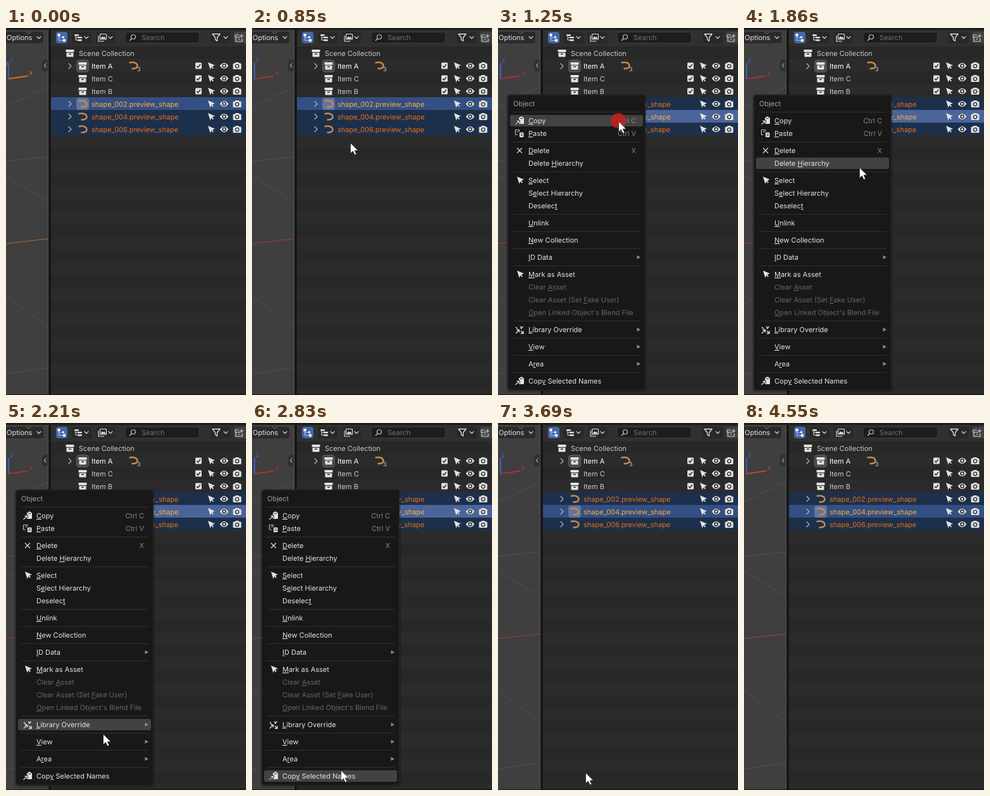
Recreate the animation shown at these times as an HTML page. Size 379 px wide and 578 px high, loop 5080 ms.

```html
<!DOCTYPE html>
<html lang="en">
<head>
<meta charset="utf-8">
<title>Outliner context menu</title>
<style>
html, body { margin: 0; width: 100%; height: 100%; overflow: hidden; background: #161616; }
svg { display: block; width: 379px; height: 578px; }
text { font: 11px Inter, sans-serif; white-space: pre; text-rendering: geometricPrecision; }
.key { text-decoration: underline; text-decoration-skip-ink: none; }
</style>
</head>
<body>
<svg id="stage" viewBox="0 0 379 578"></svg>
<script>
const LOOP = 5080;
const stage = document.getElementById('stage');

// Drawing helpers
const rect = (x, y, w, h, fill, r = 0, more = '') =>
  `<rect x="${x}" y="${y}" width="${w}" height="${h}" rx="${r}" fill="${fill}" ${more}/>`;
const line = (d, color, w = 1, more = '') =>
  `<path d="${d}" fill="none" stroke="${color}" stroke-width="${w}" ${more}/>`;
const fill = (d, color) => `<path d="${d}" fill="${color}"/>`;
const label = (x, y, s, color, more = '') =>
  `<text x="${x}" y="${y + 4}" fill="${color}" ${more}>${s}</text>`;
const at = (x, y, body) => `<g transform="translate(${x} ${y})">${body}</g>`;
const group = (id, body, more = '') => `<g id="${id}" ${more}>${body}</g>`;

// Icons, each centred on 0,0
const LIGHT = '#e2e2e2';
const round = 'stroke-linecap="round" stroke-linejoin="round"';
const chevronDown = line('M-3 -1.5L0 1.5L3 -1.5', '#cfcfcf', 1.2, round);
const chevronRight = line('M-2 -4L2 0L-2 4', '#b4b4b4', 1.2, round);
const box = rect(-6.5, -6, 13, 4, LIGHT, .8) + rect(-5.5, -1, 11, 6.5, LIGHT, .8) + rect(-2, .3, 4, 1.5, '#2b2b2b');
const pointer = fill('M-5 -6L6 -1.2L1.8 .2L4 3.2L2.6 4.2L.4 1.4L-1.4 5.4Z', LIGHT);
const eye = fill('M-6.8 0Q0 -9 6.8 0Q0 9 -6.8 0Z', LIGHT) +
  '<circle r="2.5" fill="#e2e2e2" stroke="#252525" stroke-width="1.5"/>';
const camera = rect(-6.5, -4, 13, 9.5, LIGHT, 1.5) + rect(-3, -5.6, 6, 3, LIGHT, 1) +
  '<circle cy=".6" r="2.7" fill="#e2e2e2" stroke="#252525" stroke-width="1.3"/>';
const check = rect(-5, -5, 10, 10, LIGHT, 1.5) + line('M-2.8 .2L-.8 2.4L3 -2.4', '#222', 1.5);
const curve = line('M-5.5 -4.5C1 -6 6.5 -3.5 6.5 .5C6.5 4 3 5 -1.5 5', '#c58b4f', 2.4, round);
const clip = rect(-1, -5, 8, 10, LIGHT, 1) + rect(1, -6.5, 4, 3, LIGHT, 1) + rect(1, -4, 4, 1, '#222');
const copyIcon = clip + line('M-6.5 6L-1 .8M-4.5 .3H-.7V4', '#181818', 3) +
  line('M-6.5 6L-1 .8M-4.5 .3H-.7V4', LIGHT, 1.2);
const pasteIcon = line('M-6.5 -5.5H-.5V-3M-6.5 -5.5V2H-3M-4 -2.5H-1', '#bdbdbd', 1.2) +
  rect(0, -1.5, 6.5, 7.5, LIGHT, 1) + line('M1.7 1H5M1.7 3.3H5', '#222');
const cross = line('M-4 -4L4 4M4 -4L-4 4', LIGHT, 1.1);
const overrideIcon = line('M-6 6L-1 1M-4.5 .5H-.5V4.5M-6 -4L-3 -1M1 -5L4 -2M2 2L6 6M6 2V6H2M2 -1L5.5 -5', LIGHT, 1.3);
const caret = fill('M-2.5 -3L3 0L-2.5 3Z', '#8c8c8c');

function viewport() {
  const grid = ['M0 124L66 93', 'M0 210L66 203', 'M0 233L66 273', 'M0 421L66 471', 'M0 545L66 535'];
  return rect(0, 3, 66, 574, '#3f3f3f') +
    grid.map(d => line(d, '#505050')).join('') +
    `<path id="axis" d="M0 339.5L66 332" fill="none" stroke-width="1.2"/>` +
    group('gizmoZ', line('M4 80V55', 'currentColor', 2) + label(5.5, 50, 'z', 'currentColor', 'font-weight="600"')) +
    group('gizmoX', line('M4 80L35 75.5', 'currentColor', 2) + label(36.5, 70, 'x', 'currentColor', 'font-weight="600"')) +
    group('gizmoY', label(-2, 54, 'y', '#777')) +
    rect(-6, 6, 65, 18, '#2a2a2a', 4) + label(1, 15, 'Options', '#e6e6e6') + at(52, 15, chevronDown) +
    line('M32 6L36 9L40 6', '#777') +
    rect(57, 50, 12, 18, '#303030', 4) + line('M63.5 55.5L60.5 59L63.5 62.5', '#bbb', 1.1) +
    rect(66, 0, 5, 578, '#161616') + rect(66, 3, 1, 574, '#555');
}

function header() {
  const tree = line('M-4.5 -3V4.5H2M-4.5 0H1', '#fff', 1, 'stroke-dasharray="1.5 1"') +
    rect(-6.5, -6, 4, 4, '#fff') + rect(2, 2.5, 4, 4, '#fff') + rect(1, -2, 3, 3, '#fff');
  const list = rect(-6, -5, 7, 2.5, LIGHT, .8) + line('M-4 -2V4H-1M-4 0H-1', LIGHT) +
    rect(-1, -1.2, 7, 2.4, LIGHT, .8) + rect(-1, 3, 7, 2.4, LIGHT, .8);
  const images = line('M-6 -3V6H3', LIGHT, 1.2) + rect(-3.5, -5.5, 10, 8.5, 'none', 1, `stroke="${LIGHT}" stroke-width="1.2"`) +
    fill('M-2.5 2L0 -2L2 0L3.5 -1.5L5.5 2Z', LIGHT);
  const funnel = line('M-6 -5.5H6L1.5 0V5.5L-1.5 3.5V0Z', LIGHT, 1.3, round);
  const newBox = line('M0 -4.5H-6V-1H2M-5 -1V5.5H5V1M-1.5 2H1.5M4 -6V0M1 -3H7', '#cfcfcf', 1.2);
  return rect(71, 3, 308, 26, '#303030') +
    rect(79, 6, 18, 18, '#4468a8', 4) + at(88, 15, tree) +
    rect(104, 6, 31, 18, '#282828', 4) + at(114, 15, list) + at(127, 15, chevronDown) +
    rect(142, 6, 30, 18, '#282828', 4) + at(152, 15, images) + at(165, 15, chevronDown) +
    rect(188.5, 6.5, 117, 17, '#1d1d1d', 4, 'stroke="#3b3b3b"') +
    at(200, 15, '<circle cx="1" cy="-1" r="3.5" fill="none" stroke="#bbb" stroke-width="1.2"/>' + line('M-1.5 1.5L-5 5', '#bbb', 1.4)) +
    label(214, 15, 'Search', '#717171') +
    rect(323, 6, 32, 18, '#282828', 4) + at(332, 15, funnel) + at(347, 15, chevronDown) +
    rect(360, 6, 24, 18, '#424242', 4) + at(368, 15.5, newBox);
}

const ROW = 20;
const shapes = [2, 4, 6].map((n, i) => ({ text: `shape_00${n}.preview_shape`, y: 120 + ROW * i }));
const rowTop = y => y - 11;

function outliner() {
  const bottom = 576;
  let out = rect(71, 29, 308, bottom - 29, '#282828');
  for (let y = 49; y < bottom; y += 2 * ROW) out += rect(71, y, 308, Math.min(ROW, bottom - y), '#2b2b2b');
  const toggles = y => at(324, y, pointer) + at(344.5, y - .5, eye) + at(365, y - .5, camera);
  out += at(101, 40, box) + label(115, 40, 'Scene Collection', '#c9c9c9');
  ['Item A', 'Item C', 'Item B'].forEach((name, i) => {
    const y = 60 + ROW * i;
    if (!i) out += rect(111.5, y - 9.5, 19, 19, '#4b4b4b', 4, 'stroke="#5c5c5c"') + at(101, y, chevronRight);
    out += at(121, y, box) + label(135, y, name, i ? '#c9c9c9' : '#fff') + at(304, y - .5, check) + toggles(y);
  });
  out += at(201, 59, curve) + label(207, 63.5, '3', '#c9c9c9', 'style="font-size:9px"');
  shapes.forEach((s, i) => {
    out += rect(71, rowTop(s.y), 308, ROW, '#1d304b', 0, `id="row${i}"`) +
      rect(111, s.y - 10, 20, 19, '#62759d', 4, `id="glow${i}"`) +
      at(101, s.y - .5, chevronRight) + at(121, s.y - .5, curve) +
      label(135, s.y, s.text, '#e96d12', `id="name${i}"`) + toggles(s.y);
  });
  return out + rect(71, bottom, 308, 2, '#1b1b1b');
}

// Menu entries: underlined letter is marked with "_"; blocks are split by a rule
const blocks = [
  [['_Copy', copyIcon, 'Ctrl C'], ['_Paste', pasteIcon, 'Ctrl V']],
  [['_Delete', cross, 'X'], ['Delete _Hierarchy']],
  [['_Select', pointer], ['S_elect Hierarchy'], ['Deselec_t']],
  [['_Unlink']], [['_New Collection']], [['_ID Data', '', '>']],
  [['_Mark as Asset', pointer], ['Clear _Asset', '', '', 1], ['Clear Asset (Set _Fake User)', '', '', 1],
    ['_Open Linked Object\'s Blend File', '', '', 1]],
  [['_Library Override', overrideIcon, '>']], [['_View', '', '>']], [['A_rea', '', '>']],
  [['Cop_y Selected Names', copyIcon]]
];
const items = [];

function menu() {
  let y = 146, body = '';
  blocks.forEach(block => {
    body += rect(23, y - 14, 202, 1, '#303030');
    for (const [text, icon, extra, off] of block) {
      const color = off ? '#666' : '#e4e4e4';
      if (icon) body += at(icon === pointer ? 35 : 34, y, icon);
      body += label(48, y, text.replace(/_(.)/, '<tspan class="key">$1</tspan>'), color);
      if (extra === '>') body += at(222, y, caret);
      else if (extra) body += label(218, y, extra, '#858585', 'text-anchor="end"');
      items.push({ y, off });
      y += 20;
    }
    y += 7;
  });
  return rect(13, 104, 222, 470, '#000', 6, 'opacity=".2"') +
    rect(15.5, 105.5, 217, 465, '#181818', 5, 'stroke="#272727"') +
    label(24, 119, 'Object', '#a0a0a0') +
    rect(19, 0, 210, 18, '#424242', 3, 'id="hot"') + body;
}

stage.innerHTML = viewport() + outliner() + header() + rect(0, 0, 379, 3, '#1b1b1b') +
  rect(0, 577, 71, 1, '#161616') + group('menu', menu()) +
  '<circle id="click" r="12" fill="#c91d1d"/>' +
  group('cursor', `<path d="M.5 0V16.5L4.4 13L7.2 19L9.9 17.8L7.3 12H12.5Z" fill="#fff" stroke="#222" stroke-width=".8"/>`);

const el = id => document.getElementById(id);
const set = (id, attrs) => { for (const k in attrs) el(id).setAttribute(k, attrs[k]); };
const show = (id, on) => set(id, { visibility: on ? 'visible' : 'hidden' });

// Pointer travel: start, end, steps, from, to
const moves = [
  [210, 680, 7, [138, 516], [156, 188]],
  [760, 850, 2, [155, 183], [155, 181]],
  [920, 1180, 4, [163, 173], [190, 147]],
  [1710, 2210, 8, [189, 153], [153, 490]],
  [2280, 2760, 8, [152, 493], [141, 546]],
  [2830, 2960, 2, [140, 547], [138, 551]]
];
const ease = p => p * p * (3 - 2 * p);

function pointerAt(t) {
  const move = moves.filter(m => m[0] <= t).pop();
  if (!move) return [138, 516];
  const [start, end, steps, from, to] = move;
  const n = steps - 1;
  const k = Math.min(n, Math.floor((t - start) / (end - start) * n + .02));
  return from.map((v, i) => v + (to[i] - v) * ease(k / n));
}

// Colour phases of the axes: start, axis line, x, z
const tints = [
  [0, '#a86a3a', '#e06c1c', '#2f62ad'],
  [210, '#aa3640', '#a92f39', '#3767bd'],
  [3690, '#a83b3a', '#ad3336', '#3767bd'],
  [4550, '#a34a36', '#bd4c2a', '#3565b4']
];
// Click marker: start, opacity, centre
const clicks = [
  [0, 0], [1180, .85, 190, 146], [1380, 0],
  [3160, .5, 138, 550.5], [3230, .85, 138, 550.5], [3420, .5, 138, 550.5], [3490, 0]
];
const phase = (list, t) => list.filter(p => p[0] <= t).pop();

function draw(t) {
  const [x, y] = pointerAt(t);
  const open = t >= 1250 && t < 3690;
  const active = t < 1250 ? 0 : 1;
  const visible = t >= 210 && t < 4480;

  const [, axis, xColor, zColor] = phase(tints, t);
  set('axis', { stroke: axis });
  set('gizmoX', { color: xColor });
  set('gizmoZ', { color: zColor });
  show('gizmoY', t < 210);

  const hoverY = open ? 147 : y;
  shapes.forEach((s, i) => {
    const top = rowTop(s.y);
    const hover = visible && hoverY >= top && hoverY < top + ROW;
    const on = i === active;
    set('row' + i, { fill: on ? (hover ? '#4b659a' : '#334f83') : (hover ? '#364963' : '#1d304b') });
    set('name' + i, { fill: on ? '#ffad3d' : '#e96d12' });
    show('glow' + i, on);
  });

  const hot = items.filter(i => i.y - 10 <= y).pop();
  show('menu', open);
  set('hot', { y: hot ? hot.y - 9 : 0 });
  show('hot', open && hot && !hot.off);

  const [, alpha, cx = 0, cy = 0] = phase(clicks, t);
  set('click', { cx, cy, opacity: alpha });
  set('cursor', { transform: `translate(${x.toFixed(1)} ${y.toFixed(1)})` });
  show('cursor', visible);
}

const begin = performance.now();
function tick() {
  draw((performance.now() - begin) % LOOP);
  requestAnimationFrame(tick);
}
tick();
</script>
</body>
</html>
```
